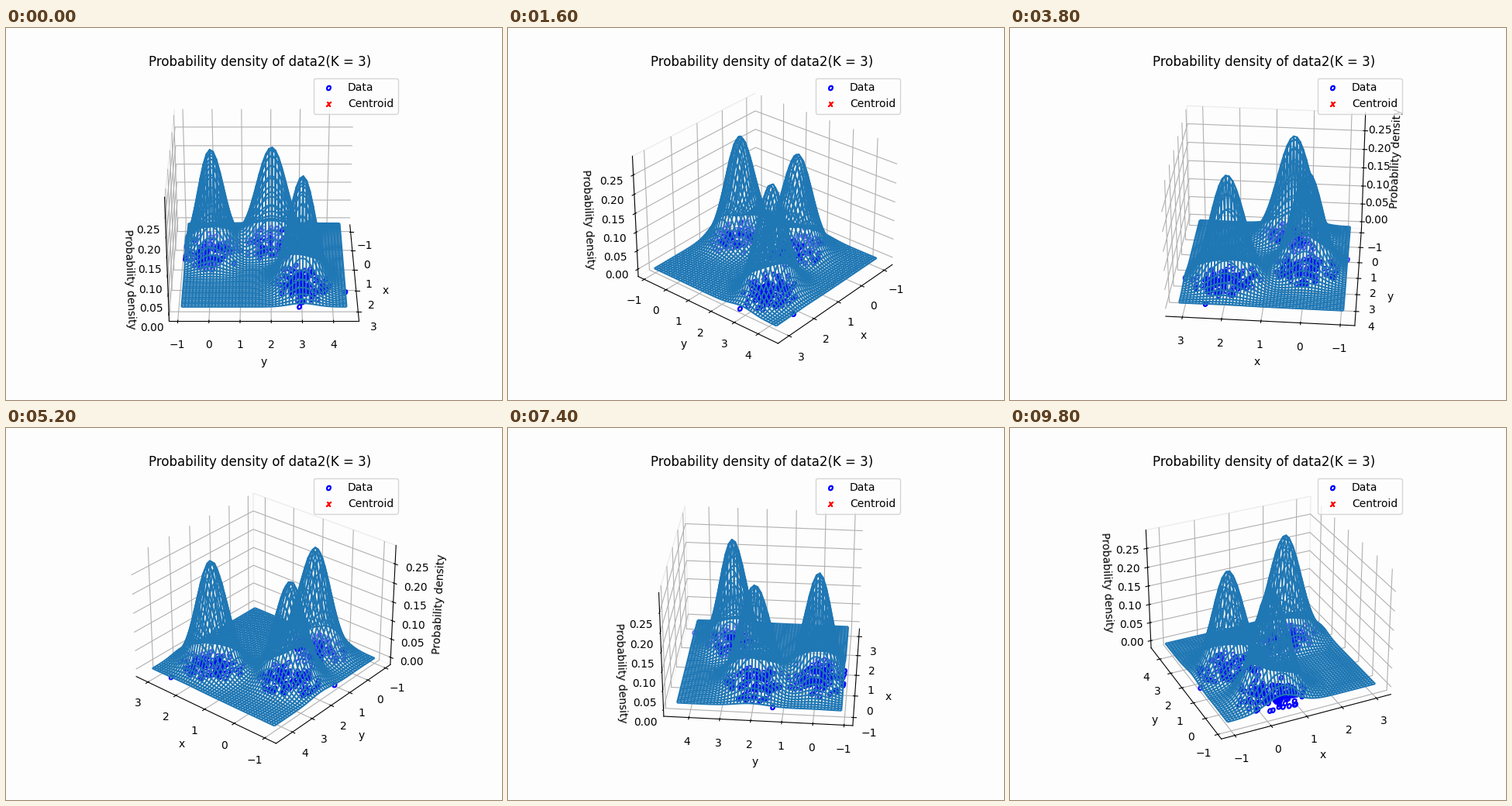
Recreate the animation shown at these times as a matplotlib script. Size 640 px wide and 480 px high, loop 10000 ms.

```python
import matplotlib.pyplot as plt
import numpy as np
from matplotlib.animation import FuncAnimation

FRAMES, INTERVAL, STEP = 50, 200, 5
PAPER = "#fdfdfd"
plt.rcParams.update({"figure.facecolor": PAPER, "axes.facecolor": PAPER})

LOW, HIGH = (-1.06, -0.89), (3.12, 4.43)

# centre x, centre y, sigma x, sigma y
CLUSTERS = [
    (0.45, 0.00, 0.445, 0.436),
    (0.00, 2.02, 0.400, 0.514),
    (1.98, 3.00, 0.440, 0.433),
]
# the points that set the extent of the data
EXTREMES = [(HIGH[0], 2.91), (2.44, HIGH[1]), (LOW[0], 1.32), (0.8, LOW[1])]


def density(x, y):
    """Mixture of normal distributions with equal weights."""
    total = 0
    for cx, cy, sx, sy in CLUSTERS:
        dist2 = ((x - cx) / sx) ** 2 + ((y - cy) / sy) ** 2
        total = total + np.exp(-dist2 / 2) / (2 * np.pi * sx * sy)
    return total / len(CLUSTERS)


def sample(rng, cx, cy, sx, sy, count=99, reach=2.3):
    """Normal points, cut off at `reach` standard deviations."""
    share = 1 - np.exp(-reach ** 2 / 2)
    r = np.sqrt(-2 * np.log(1 - share * rng.random(count)))
    a = rng.uniform(0, 2 * np.pi, count)
    pts = np.column_stack([cx + sx * r * np.cos(a), cy + sy * r * np.sin(a)])
    return np.clip(pts, LOW, HIGH)


rng = np.random.default_rng(4)
points = np.vstack([sample(rng, *c) for c in CLUSTERS] + [EXTREMES])
gx, gy = np.meshgrid(*(np.linspace(a, b, 50) for a, b in zip(LOW, HIGH)))

fig = plt.figure(figsize=(6.4, 4.8), dpi=100)
ax = fig.add_subplot(projection="3d")
ax.plot_wireframe(gx, gy, density(gx, gy))
data = ax.scatter(points[:, 0], points[:, 1], 0, c="b", marker="$o$", label="Data")
centroid = ax.scatter([0], [2], [0], c="r", marker="$x$", label="Centroid")
centroid.remove()  # only its legend entry is seen

ax.set_title("Probability density of data2(K = 3)")
ax.set_xlabel("x")
ax.set_ylabel("y")
ax.set_zlabel("Probability density")
ax.legend(handles=[data, centroid])
for axis in (ax.xaxis, ax.yaxis, ax.zaxis):
    axis.pane.set_facecolor(PAPER)
    axis.pane.set_edgecolor(PAPER)
ax.yaxis.pane.set_edgecolor("#dcdcdc")


def update(i):
    ax.view_init(elev=30, azim=STEP * i)
    return []


anim = FuncAnimation(fig, update, frames=FRAMES, interval=INTERVAL,
                     repeat=True, repeat_delay=0)
plt.show()
```
